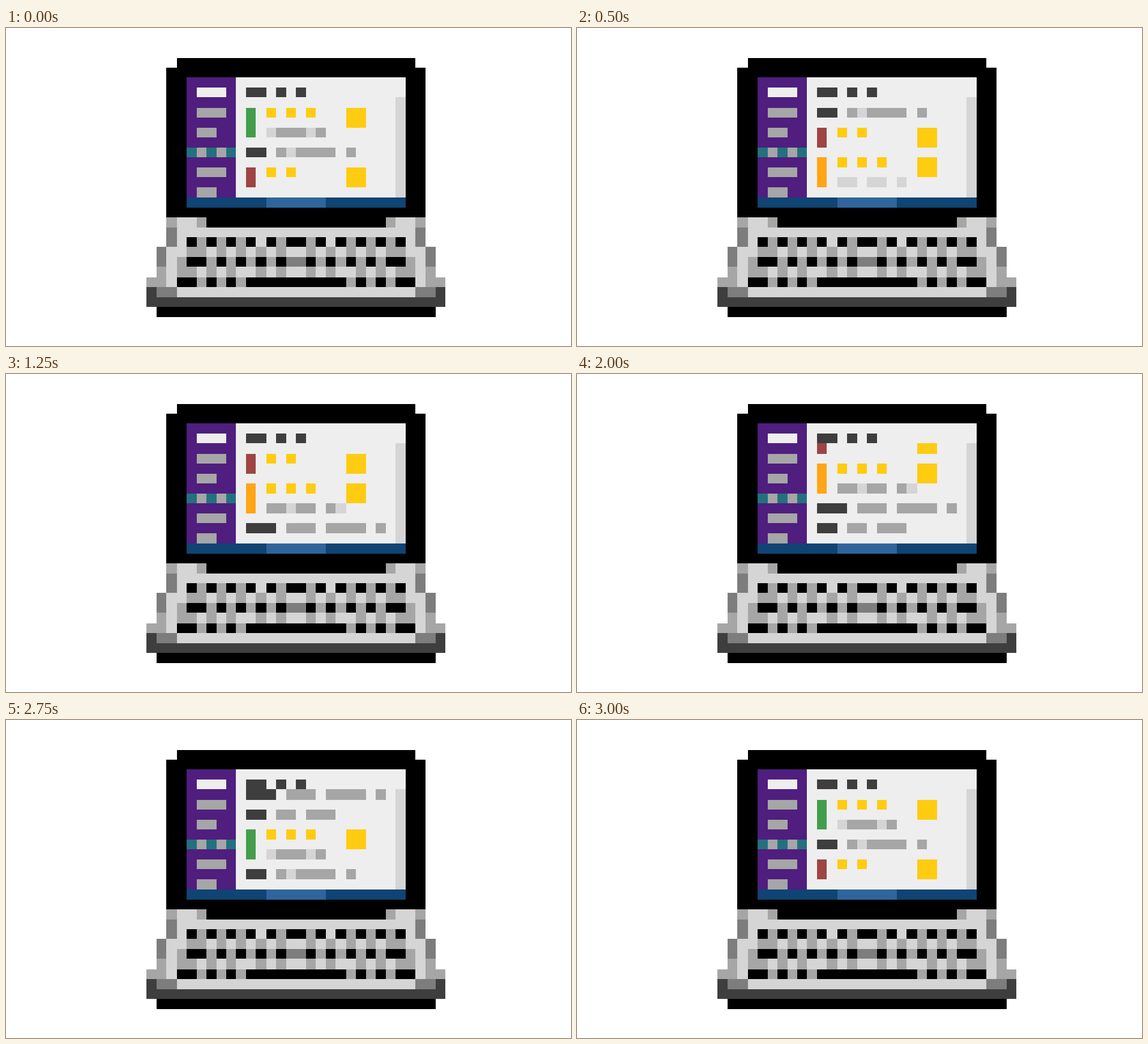
An HTML page with a canvas for the animation above (3.25 s loop, 998 px wide and 561 px high).

```html
<!DOCTYPE html>
<html>
<head>
<meta charset="utf-8">
<style>
html, body { margin: 0; width: 100%; height: 100%; overflow: hidden; background: #fff; }
canvas { display: block; }
</style>
</head>
<body>
<canvas width="998" height="561"></canvas>
<script>
const ctx = document.querySelector('canvas').getContext('2d');
const LOOP = 3250;
const colors = {
  K: '#000', W: '#eee', L: '#d5d5d5', M: '#a6a6a6', G: '#7d7d7d', D: '#3e3e3e',
  P: '#4f1e7e', T: '#23717f', N: '#104474', B: '#2f659c',
  Y: '#ffcc11', E: '#449d4c', R: '#9e4444', O: '#ffa516'
};

// Left half of the base, mirrored to the right
const base = [
  '..MLLMKKKKKKKKK',
  '..GLLLLLLLLLLLL',
  '..GLKMKMKMKLKMK',
  '.GLLMMLMLMLMLML',
  '.GLMKKMKMKMKMKG',
  '.MLMMLMLMLLMLML',
  'MMLKKMKMKMKKKKK',
  'DGGLLLLLLLLLLLL',
  'DDDDDDDDDDDDDDD',
  '.KKKKKKKKKKKKKK'
];

// Message feed, repeating endlessly
const feed = [
  'E.Y.Y.Y...YY',
  'E.........YY',
  'E.LMMMLM',
  '',
  'DD.MLMMMM.M',
  '',
  'R.Y.Y.....YY',
  'R.........YY',
  '',
  'O.Y.Y.Y...YY',
  'O.........YY',
  'O.MMLMM.ML',
  '',
  'DDD.MMM.MMMM.M',
  '',
  'DD.MM.MMM',
  ''
];

// Start time, rows scrolled, newest text still loading
const steps = [
  [0, 0], [500, 4, true], [750, 4], [1250, 6], [2000, 8],
  [2250, 12, true], [2500, 12], [2750, 14], [3000, 17]
];

// Grid lines; about every eighth cell is one pixel larger
const edge = (start, phase, i) =>
  Math.round(start + 17.47 * i + 1.03 * Math.floor((i + phase) / 8.33));
const px = col => edge(248.2, 5.5, col);
const py = row => edge(52.5, 3.5, row);

function box(color, col, row, w = 1, h = 1) {
  ctx.fillStyle = colors[color];
  ctx.fillRect(px(col), py(row), px(col + w) - px(col), py(row + h) - py(row));
}

function line(text, col, row) {
  [...text].forEach((c, i) => colors[c] && box(c, col + i, row));
}

function drawLaptop() {
  box('K', 3, 0, 24);
  box('K', 2, 1, 26, 15);
  base.forEach((half, i) => line(half + [...half].reverse().join(''), 0, 16 + i));
}

function drawScreen() {
  box('W', 9, 2, 17, 12);
  box('P', 4, 2, 5, 12);
  box('W', 5, 3, 3);
  box('M', 5, 5, 3);
  box('M', 5, 7, 2);
  line('TMTMT', 4, 9);
  box('M', 5, 11, 3);
  box('M', 5, 13, 2);
  box('N', 4, 14, 22);
  box('B', 12, 14, 6);
  line('DD.D.D', 10, 3);
  box('L', 25, 4, 1, 10);
}

function drawFeed(scroll, loading) {
  const n = feed.length;
  for (let row = 4; row < 14; row++) {
    let text = feed[(row - 5 + scroll + n) % n];
    if (loading && row === 12) text = text.replace(/L/g, '.').replace(/M/g, 'L');
    line(text, 10, row);
  }
}

let shown;
function tick(now) {
  const t = now % LOOP;
  const step = steps.findLast(s => s[0] <= t);
  if (step !== shown) {
    shown = step;
    ctx.fillStyle = '#fff';
    ctx.fillRect(0, 0, 998, 561);
    drawLaptop();
    drawScreen();
    drawFeed(step[1], step[2]);
  }
  requestAnimationFrame(() => tick(performance.now()));
}
tick(performance.now());
</script>
</body>
</html>
```
